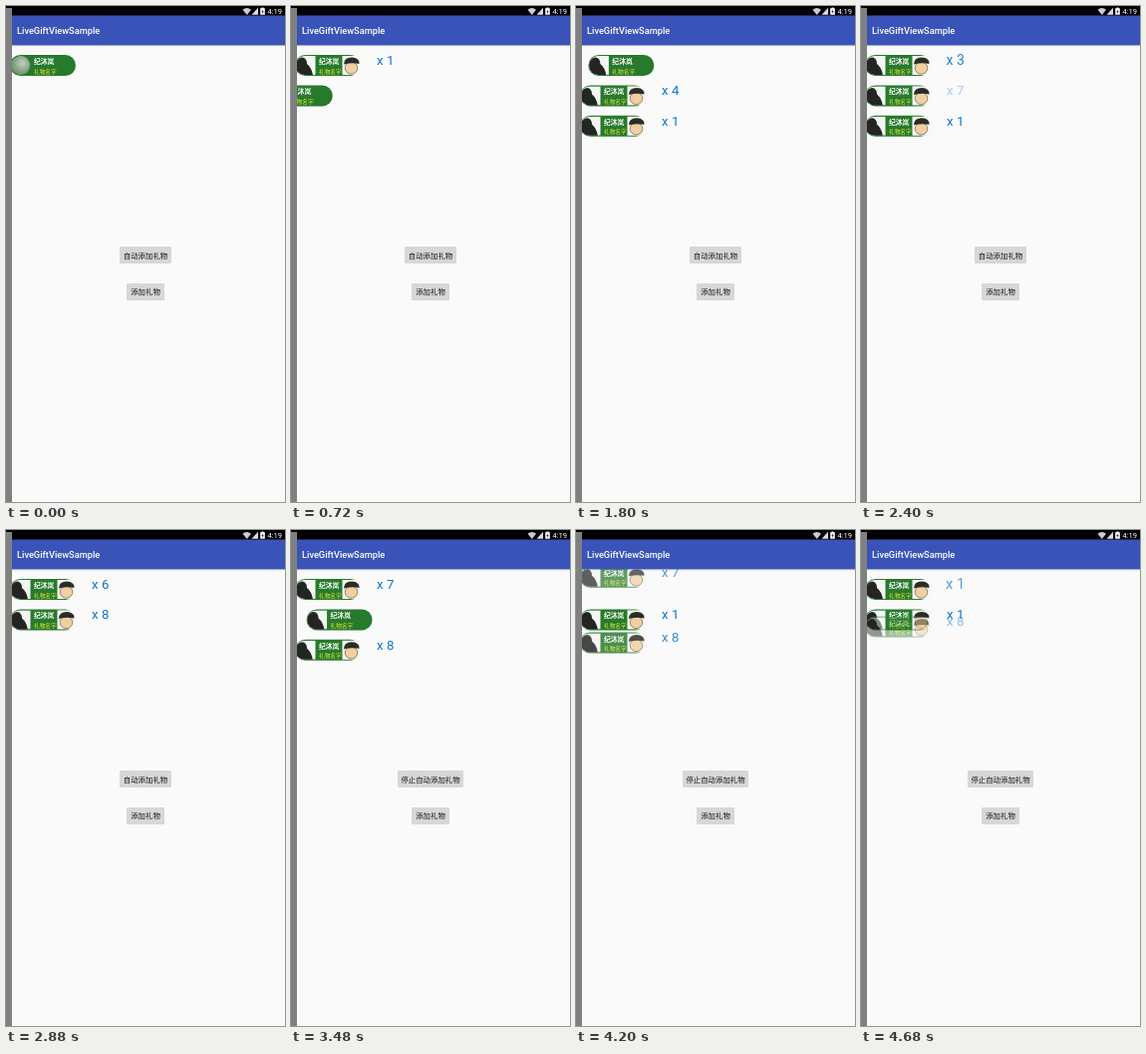
These frames come from a looping animation (280 by 497 pixels, 4.8 s). An HTML page:

```html
<!DOCTYPE html>
<html lang="zh">
<head>
<meta charset="utf-8">
<title>LiveGiftViewSample</title>
<style>
html, body { margin: 0; width: 100%; height: 100%; overflow: hidden; background: #fafafa; }
svg { display: block; width: 100vw; height: 100vh; }
text { font-family: Roboto, "Noto Sans CJK SC", "Noto Sans CJK", sans-serif; }
.mid { text-anchor: middle; }
.btn text { font-size: 7.4px; font-weight: 500; fill: #181818; }
.btn rect { fill: #d6d7d7; }
.name { font-size: 6.8px; font-weight: 700; fill: #fff; }
.label { font-size: 5.7px; fill: #dfe63a; }
.count { font-size: 13.2px; fill: #0f72cc; }
</style>
</head>
<body>
<svg viewBox="0 0 280 497" preserveAspectRatio="none">
  <defs>
    <clipPath id="stage"><rect x="6" y="39" width="274" height="458"/></clipPath>
    <clipPath id="pill"><rect x=".8" y="1" width="63.5" height="19" rx="9"/></clipPath>
    <radialGradient id="blur" cx=".6" cy=".4" r=".6">
      <stop offset="0" stop-color="#c3cfbb"/>
      <stop offset="1" stop-color="#6f8f70"/>
    </radialGradient>
  </defs>
  <rect width="280" height="497" fill="#fafafa"/>
  <rect y="2" width="6" height="495" fill="#808080"/>
  <g class="btn">
    <rect id="autoBox" y="241" height="17" rx="1"/>
    <text id="autoText" class="mid" x="140" y="252.5"></text>
    <rect x="121" y="278" width="38" height="17" rx="1"/>
    <text class="mid" x="140" y="289">添加礼物</text>
  </g>
  <g id="list" clip-path="url(#stage)"></g>
  <rect x="6" y="39" width="274" height="1.5" fill="#000" opacity=".07"/>
  <rect x="6" y="9" width="274" height="30.4" fill="#3a53b8"/>
  <rect width="280" height="2" fill="#000"/>
  <rect x="6" width="274" height="9.5" fill="#000"/>
  <text x="11" y="27.7" font-size="9.25" font-weight="500" fill="#fff">LiveGiftViewSample</text>
  <g fill="#fff">
    <g transform="translate(0 .5)">
      <path d="M237.5 3.2Q241.8 -.2 246 3.2L241.8 8.4Z" fill="#ccc"/>
      <path d="M253 1.3V8.3H246.6Z" fill="#ddd"/>
      <path d="M255.2 1.8H256.6V1H258.4V1.8H259.8V8.3H255.2Z"/>
      <path d="M258 2.8L256.3 5.4H257.4L257 7.4L258.8 4.7H257.6Z" fill="#222"/>
    </g>
    <text x="262.4" y="8.3" font-size="7.6">4:19</text>
  </g>
</svg>
<script>
const LOOP = 4800, STEP = 120, PULSE = 120;
const LEFT = 4, ROW_TOP = 49, ROW_GAP = 30.4, SLIDE = 75, RIGHT = 221;

// start/dur: entrance, out/outDur: rise and fade, counts: [time, number]
const gifts = [
  { row: 0, start: -125, dur: 400, out: 1330, outDur: 190, counts: [[355, 1]], loading: 240 },
  { row: 0, start: 1520, dur: 400, out: 4120, outDur: 200,
    counts: [[2000, 1], [2150, 2], [2300, 3], [2450, 4], [2600, 5], [2740, 6], [2990, 7]] },
  { row: 0, start: 4200, dur: 400, counts: [[4620, 1]] },
  { row: 1, start: 660, dur: 400, out: 2890, outDur: 220,
    counts: [[1140, 1], [1220, 2], [1310, 3], [1560, 4], [1900, 5], [2150, 6], [2400, 7], [2640, 8]] },
  { row: 1, start: 3264, dur: 400, counts: [[3744, 1]] },
  { row: 2, start: 1200, dur: 281, fromRight: true, out: 2400, outDur: 320, counts: [[1080, 1]] },
  { row: 2, start: 2885, dur: 160, out: 3980, outDur: 920, counts: [[3000, 8]] }
];

const $ = id => document.getElementById(id);
const clamp = v => Math.max(0, Math.min(1, v));
const overshoot = (p, k = 2.2) => (p - 1) ** 2 * ((k + 1) * (p - 1) + k) + 1;

const markup = `
  <rect width="66" height="21" rx="10.5" fill="#277a2c"/>
  <g clip-path="url(#pill)">
    <g class="face">
      <rect y="1" width="20.500" height="19" fill="#f4f6f3"/>
      <path d="M0 21V10Q2 3 7 2.5Q12 3 12 9Q17 13 18 21Z" fill="#222522"/>
    </g>
    <circle class="soft" cx="10.500" cy="10.500" r="9.600" fill="url(#blur)"/>
  </g>
  <text class="name" x="24" y="9.1">纪沐岚</text>
  <text class="label" x="24" y="18.600">礼物名字</text>
  <g class="gift">
    <rect x="47.500" y="1" width="19" height="19" fill="#f8f8f4"/>
    <ellipse cx="56.500" cy="13.200" rx="6.300" ry="6" fill="#f1cfa2" stroke="#54463a" stroke-width=".6"/>
    <path d="M49 9.500Q49 2.500 57 2.500Q65 3 64.500 9Q57 7.500 49 9.500Z" fill="#2b2c26"/>
  </g>
  <text class="count mid" y="4.700"></text>`;

for (const g of gifts) {
  g.el = document.createElementNS("http://www.w3.org/2000/svg", "g");
  g.el.innerHTML = markup;
  $("list").append(g.el);
  for (const part of ["face", "soft", "gift", "count"]) g[part] = g.el.querySelector("." + part);
}

const show = (el, on) => el.setAttribute("display", on ? "inline" : "none");
const move = (el, x, y, s = 1) => el.setAttribute("transform", `translate(${x} ${y}) scale(${s})`);

function drawGift(g, t) {
  const rise = g.out ? clamp((t - g.out) / g.outDur) : 0;
  const visible = t >= g.start && rise < 1;
  show(g.el, visible);
  if (!visible) return;

  const p = clamp((t - g.start) / g.dur);
  const dx = g.fromRight ? RIGHT * (1 - p) : SLIDE * (overshoot(p) - 1);
  move(g.el, LEFT + dx, ROW_TOP + ROW_GAP * g.row - 30.5 * rise);
  g.el.setAttribute("opacity", 1 - 0.7 * rise);

  const loading = t < (g.loading || 0);
  show(g.soft, loading);
  show(g.face, !loading);

  const q = g.fromRight ? 1 : clamp((t - g.start - 0.9 * g.dur) / (0.3 * g.dur));
  show(g.gift, q > 0);
  move(g.gift, -64 * (1 - q) ** 2, 0);

  const last = g.counts.filter(c => c[0] <= t).pop();
  show(g.count, last);
  if (!last) return;
  const k = clamp((t - last[0]) / PULSE);
  g.count.textContent = "x " + last[1];
  g.count.setAttribute("opacity", 0.35 + 0.65 * k);
  move(g.count, 90.7, 5.2, 1 + 0.12 * Math.sin(Math.PI * k));
}

function draw(time) {
  const t = Math.floor((time % LOOP) / STEP) * STEP;
  const auto = t >= 3120;
  $("autoText").textContent = (auto ? "停止" : "") + "自动添加礼物";
  $("autoBox").setAttribute("x", auto ? 107 : 114);
  $("autoBox").setAttribute("width", auto ? 66 : 52);
  for (const g of gifts) drawGift(g, t);
}

const t0 = performance.now();
function tick() {
  draw(performance.now() - t0);
  requestAnimationFrame(tick);
}
tick();
</script>
</body>
</html>
```
